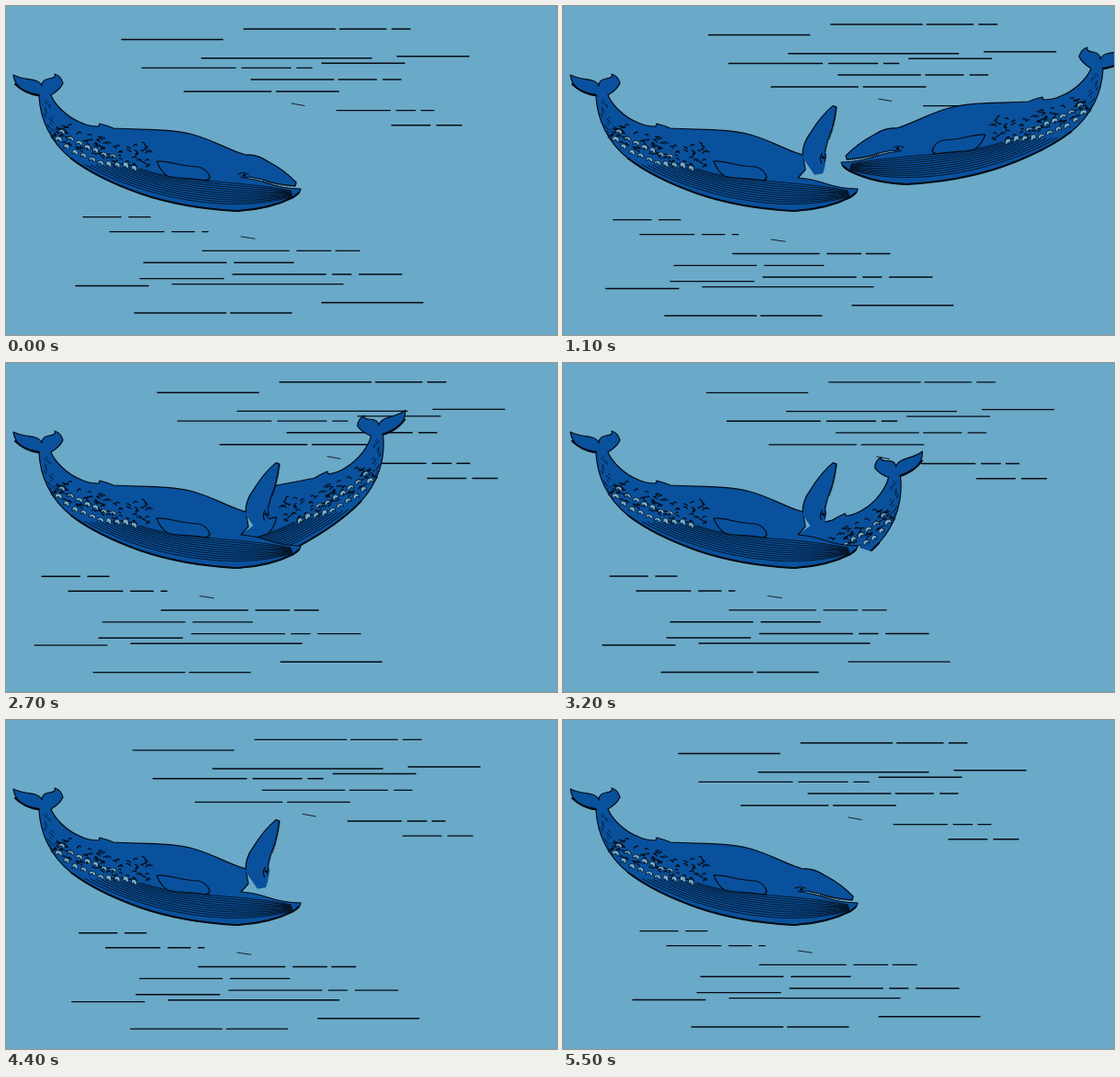
An HTML page that plays this animation: 600 px wide and 358 px high, repeating every 5600 ms.

```html
<!DOCTYPE html>
<html lang="en">
<head>
<meta charset="utf-8">
<title>Whales</title>
<style>
  html, body { margin: 0; width: 100%; height: 100%; overflow: hidden; background: #6aa9c7; }
  svg { display: block; width: 100%; height: 100%; }
  path { fill: none; stroke-linecap: round; stroke-linejoin: round; }
  .skin { fill: #09519d; }
  .ink { stroke: #050b14; stroke-width: 1.2; }
  .fine { stroke-width: .85; }
  .bold { stroke-width: 2; }
  .dash { stroke-width: 1.4; }
  .spot { fill: #78acc4; stroke: #071a30; stroke-width: .9; }
</style>
</head>
<body>
<svg viewBox="0 0 600 358" preserveAspectRatio="none">
  <defs>
    <g id="body">
      <path class="skin ink" d="M8 75C18 80 26 79 32 81Q38 83 39 87Q39 80 47 79Q55 78 53 74Q60 76 62 84Q59 91 49 97C53 107 66 121 82 127Q90 131 101 131L102 128Q110 130 117 133C150 135 176 133 204 140C226 146 243 157 261 162L264 178L256 187Q270 188 282 192Q302 199 321 199Q320 205 313 208C297 216 275 222 250 223C215 221 178 215 146 204C115 193 88 179 71 166C48 148 37 122 36 98C24 96 10 91 8 75Z"/>
      <path class="ink bold" d="M10 85Q20 95 36 97M71 166C88 179 115 193 146 204C178 215 215 221 250 223C275 222 297 216 313 208L319 203"/>
      <g id="marks"></g>
      <path class="skin ink" d="M164 169C179 168 189 175 210 175Q220 178 222 187L218 190C201 187 186 188 176 185Q169 181 164 169M200 188L222 190"/>
    </g>
    <g id="head">
      <path class="skin" d="M258 162Q272 160 284 168Q304 179 316 192L315 196Q292 194 280 189L268 187Q255 189 242 185L240 176Z"/>
      <path class="ink" d="M261 162Q273 161 285 169Q304 179 316 192L315 196Q292 194 280 189L266 186M253 183Q258 180 264 183M256 186Q260 188 264 186"/>
      <path class="ink bold" stroke-dasharray="1 1.4" style="stroke-linecap:butt" d="M280 190Q296 195 315 196"/>
      <circle cx="259.500" cy="184.300" r="1.700" fill="#050b14"/>
    </g>
    <clipPath id="mouth">
      <path d="M296 0V112L284 166L256 187Q270 188 282 192Q302 199 321 200L332 204L900 300V0Z"/>
    </clipPath>
  </defs>
  <g id="above"></g>
  <g id="below"></g>
  <g clip-path="url(#mouth)">
    <g id="prey"><use href="#body"/><use href="#head"/></g>
  </g>
  <use href="#body"/>
  <g id="jaw"><use href="#head"/></g>
</svg>
<script>
const byId = id => document.getElementById(id);
const lerp = (a, b, u) => a + (b - a) * u;
const clamp = u => Math.max(0, Math.min(1, u));

let seed = 11;
const random = (low = 0, high = 1) =>
  lerp(low, high, (seed = seed * 16807 % 2147483647) / 2147483647);

function add(parent, className, d) {
  const path = document.createElementNS('http://www.w3.org/2000/svg', 'path');
  path.setAttribute('class', className);
  path.setAttribute('d', d);
  parent.append(path);
}

const drawLine = (group, x, y, length) => add(group, 'ink dash', `M${x} ${y}h${length}`);

// Breaks a line into one long stroke and a trail of short ones.
function drawBroken(group, x, y, length) {
  const end = x + length;
  for (let share = .55; x < end - 3; share = random(.1, .5)) {
    const dash = Math.min(end - x, Math.max(4, length * share));
    drawLine(group, x, y, dash);
    x += dash + random(5, 9);
  }
}

const above = byId('above'), below = byId('below');
drawLine(above, 126, 36.5, 110);
drawLine(above, 426, 54.7, 78);
drawLine(above, 213, 56.7, 185);
drawLine(above, 344, 62.2, 90);
drawBroken(above, 259, 25, 181);
drawBroken(above, 148, 67.4, 185);
drawBroken(above, 267, 80, 163);
drawBroken(above, 194, 93, 172);
drawBroken(above, 360, 113.6, 106);
drawBroken(above, 420, 129.8, 76);
drawLine(below, 146, 296.6, 91);
drawLine(below, 181, 302.6, 186);
drawLine(below, 76, 304.5, 79);
drawLine(below, 344, 322.7, 110);
drawBroken(below, 84, 229.6, 75);
drawBroken(below, 113, 245.6, 107);
drawBroken(below, 214, 266.4, 171);
drawBroken(below, 150, 279.3, 163);
drawBroken(below, 247, 292, 184);
drawBroken(below, 140, 334, 181);
add(above, 'ink fine', 'M311 106l14 2.500');
add(below, 'ink fine', 'M256 251l15 2.200');

// Throat grooves blend from the flank curve to the belly curve.
const marks = byId('marks');
const flank = [146, 177, 190, 193, 250, 189, 310, 201];
const belly = [80, 172, 135, 205, 235, 233, 312, 208];
for (let i = 0; i < 11; i++) {
  const [x, y, ...rest] = flank.map((v, k) => lerp(v, belly[k], i / 11).toFixed(1));
  add(marks, 'ink fine', `M${x} ${y}C${rest.join(' ')}`);
}

// Skin flecks and pale patches follow the flank.
const flankY = x => 139 + 37 * (1 - Math.exp((50 - x) / 32));
for (let i = 0; i < 100; i++) {
  const x = random(51, 156);
  const y = flankY(x) + 1 - random(0, 27) * Math.min(1, (x - 38) / 30);
  const w = random(2, 4.5), h = random(-2, 3);
  add(marks, 'ink', `M${x} ${y}q${w / 2} ${h - 2} ${w} ${h}`);
}
for (let y = 102; y < 146; y += 1.7)
  add(marks, 'ink fine', `M${38 + (y - 102) * .22 + random(0, 8)} ${y}l1.500 1.500`);
for (let row = 0; row < 2; row++)
  for (let x = 54; x < 144 - row * 34; x += 9.2) {
    const w = random(5, 7), h = random(4, 6) - row;
    add(marks, 'spot', `M${x + row * 4} ${flankY(x) - row * 9 + random(-2, 1)}q${w / 2} ${-h / 2} ${w} 1q1 ${h} -2 ${h - 1}q-1 -4 -${w - 2} -1z`);
  }

// Time, position of the back fin, tilt.
const preyPath = [
  [0, 860, 92, 0], [1100, 522, 100, 0], [2000, 437, 111, 2],
  [2700, 350, 119, 8.7], [3800, 256, 219.5, 10], [5600, 90, 480, 10]
];

function preyAt(t) {
  const i = preyPath.findIndex(key => key[0] > t);
  const a = preyPath[i - 1], b = preyPath[i];
  return a.map((v, k) => lerp(v, b[k], (t - a[0]) / (b[0] - a[0])));
}

function aboveX(t) {
  return t < 2250
    ? 47 * Math.sin(Math.PI / 2 * t / 2250)
    : 47 * (1 - clamp((t - 2250) / 3250)) ** 1.25;
}

function belowX(t) {
  if (t < 2170) return lerp(0, -57.5, t / 2170);
  if (t < 5000) return lerp(-57.5, 10, (t - 2170) / 2830);
  return lerp(10, 0, clamp((t - 5000) / 500));
}

function render(now) {
  const t = Math.floor(now % 5600 / 100) * 100;
  const place = (id, transform) => byId(id).setAttribute('transform', transform);
  const spread = clamp(Math.min(t / 500, (5400 - t) / 400));
  const open = clamp(Math.min(t, 5400 - t) / 1000);
  const [, x, y, tilt] = preyAt(t);
  place('above', `translate(${aboveX(t)} ${-spread * (5.4 - t * .0004)})`);
  place('below', `translate(${belowX(t)} ${spread * (3.4 - t * .0003)})`);
  place('jaw', `rotate(${-87 * open} 261 162)`);
  place('prey', `translate(${x} ${y}) rotate(${-tilt}) scale(-1 1) translate(-102 -129)`);
}

const start = performance.now();
function tick() {
  render(performance.now() - start);
  requestAnimationFrame(tick);
}
tick();
</script>
</body>
</html>
```
